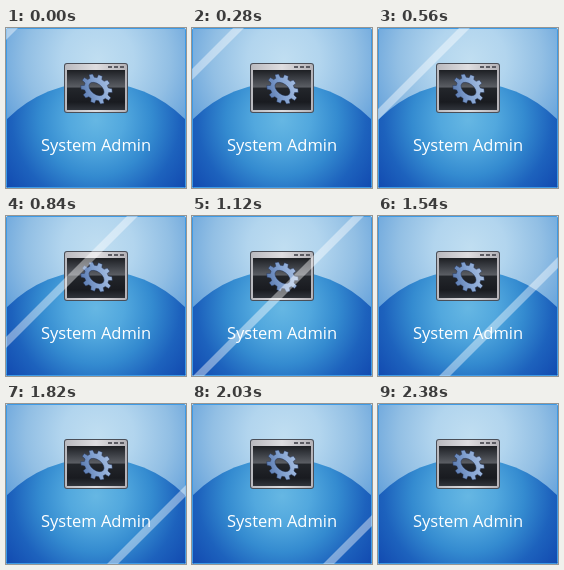
An HTML page with a canvas for the animation above (3380 ms loop, 180x160 px).

```html
<!DOCTYPE html>
<html lang="en">
<head>
<meta charset="utf-8">
<title>System Admin</title>
<style>
  html, body { margin: 0; width: 100%; height: 100%; overflow: hidden; background: #fff; }
  canvas { display: block; width: 180px; height: 160px; }
</style>
</head>
<body>
<canvas id="stage" width="180" height="160"></canvas>
<script>
const W = 180, H = 160, STEP = 70, LAST = 34, LOOP = 3380;
const canvas = document.getElementById('stage');
const ctx = canvas.getContext('2d');

function ramp(gradient, ...stops) {
  stops.forEach(([at, color]) => gradient.addColorStop(at, color));
  return gradient;
}
const linear = (x0, y0, x1, y1, ...stops) =>
  ramp(ctx.createLinearGradient(x0, y0, x1, y1), ...stops);
const radial = (x, y, r, ...stops) =>
  ramp(ctx.createRadialGradient(x, y, 0, x, y, r), ...stops);

function box(x, y, w, h, r) {
  ctx.beginPath();
  ctx.roundRect(x, y, w, h, r);
}

function drawTile() {
  // pale sky
  ctx.fillStyle = radial(92, 32, 120,
    [0, '#c0def1'], [0.3, '#b2d5ee'], [0.6, '#92bfe4'], [0.85, '#6ca6dc'], [1, '#5595d5']);
  ctx.fillRect(0, 0, W, H);

  // large disc rising from below, lit in the middle
  ctx.beginPath();
  ctx.arc(90, 179, 125, 0, Math.PI * 2);
  ctx.fillStyle = radial(90, 92, 112,
    [0, '#66b7e3'], [0.25, '#52a8de'], [0.5, '#348bd0'], [0.75, '#1d62bd'], [1, '#124ab0']);
  ctx.fill();

  ctx.strokeStyle = '#3f9be6';
  ctx.lineWidth = 1;
  box(0.5, 0.5, W - 1, H - 1, 1);
  ctx.stroke();
}

function drawGear(x, y) {
  const teeth = 10, slice = Math.PI * 2 / teeth;
  ctx.save();
  ctx.translate(x, y);
  ctx.rotate(0.65);
  ctx.scale(1.08, 0.9);
  ctx.beginPath();
  for (let i = 0; i < teeth; i++) {
    [[-0.32, 12], [-0.2, 15.5], [0.2, 15.5], [0.32, 12]].forEach(([turn, r]) => {
      const a = (i + turn) * slice;
      ctx.lineTo(Math.cos(a) * r, Math.sin(a) * r);
    });
  }
  ctx.closePath();
  ctx.moveTo(8, 0);
  ctx.ellipse(0, 0, 8, 5.8, 0, 0, Math.PI * 2, true);
  ctx.fillStyle = linear(-10, 10, 10, -10, [0, '#5f7fb4'], [0.5, '#84a3d2'], [1, '#a3bbdf']);
  ctx.fill('evenodd');
  ctx.strokeStyle = 'rgba(35,50,85,.6)';
  ctx.lineWidth = 0.7;
  ctx.stroke();
  ctx.restore();
}

function drawWindow() {
  box(58, 35, 64, 50, 3);
  ctx.fillStyle = '#4a4e57';
  ctx.fill();
  box(59, 36, 62, 48, 2);
  ctx.fillStyle = linear(59, 0, 121, 0, [0, '#b9b9be'], [0.5, '#dedde0'], [1, '#b4b2b7']);
  ctx.fill();
  ctx.fillStyle = '#5b5b62';
  for (let i = 0; i < 3; i++) ctx.fillRect(102 + i * 6, 38, 4, 2);

  ctx.fillStyle = linear(0, 42, 0, 82,
    [0, '#1d1f23'], [0.2, '#3a3d43'], [0.42, '#5a5d63'], [0.46, '#23262b'], [0.8, '#191b20'], [1, '#30343b']);
  ctx.fillRect(61, 42, 58, 40);
  drawGear(90.5, 61);
}

function drawLabel() {
  ctx.font = '16.5px "Open Sans", "Noto Sans", sans-serif';
  ctx.textAlign = 'center';
  ctx.fillStyle = '#fff';
  ctx.fillText('System Admin', 90, 123);
}

function drawShine(step) {
  const near = step * 10 + 1, far = near + 11;
  ctx.beginPath();
  ctx.moveTo(near, 0);
  ctx.lineTo(far, 0);
  ctx.lineTo(far - H, H);
  ctx.lineTo(near - H, H);
  ctx.closePath();
  ctx.fillStyle = 'rgba(255,255,255,.42)';
  ctx.fill();
}

function render(time) {
  const step = Math.min(LAST, Math.floor((time % LOOP) / STEP));
  ctx.clearRect(0, 0, W, H);
  ctx.save();
  box(0, 0, W, H, 2);
  ctx.clip();
  drawTile();
  drawWindow();
  drawLabel();
  drawShine(step);
  ctx.restore();
}

let start;
function tick(now) {
  start ??= now;
  render(now - start);
  requestAnimationFrame(tick);
}
render(0);
requestAnimationFrame(tick);
</script>
</body>
</html>
```
